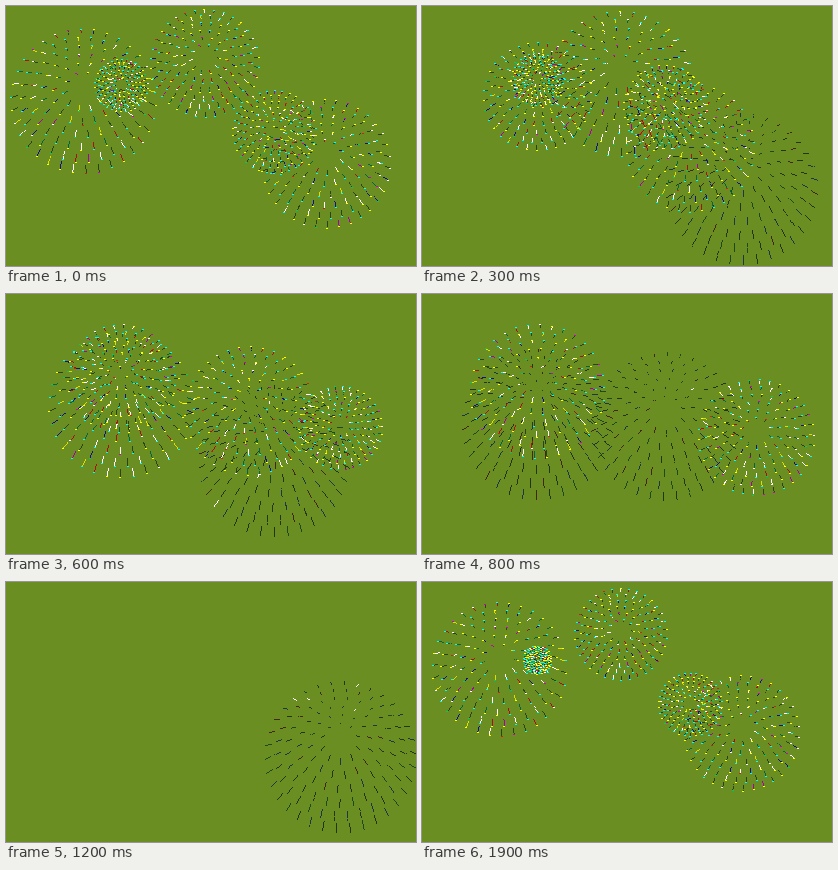
Animation, 410 px wide and 260 px high, one loop 2 s. Source, as an HTML page with a canvas:

```html
<!DOCTYPE html>
<html lang="en">
<head>
<meta charset="utf-8">
<title>Fireworks</title>
<style>
html, body { margin: 0; width: 100%; height: 100%; overflow: hidden; background: #6b8e23; }
canvas { display: block; }
</style>
</head>
<body>
<canvas id="sky" width="410" height="260"></canvas>
<script>
const ctx = document.getElementById('sky').getContext('2d');
const LOOP = 2000, STEP = 100;
const START_AGE = 1, FADE_AGE = 8, END_AGE = 10.2;

// x, y of each burst, in order of launch
const bursts = [
  [77, 61], [319.5, 135], [198.5, 43.5], [268, 119],
  [115, 77], [243, 94], [115, 71], [334, 127]
].map(([x, y], i) => ({ x, y, birth: 1200 + 150 * i, sparks: makeSparks(i + 1) }));

function seeded(seed) {
  let s = seed * 7919;
  return () => {
    s = (s * 1664525 + 1013904223) % 4294967296;
    return s / 4294967296;
  };
}

// list of [colour, weight], weights adding up to 1
function pick(list, n) {
  for (const [colour, weight] of list) {
    n -= weight;
    if (n < 0) return colour;
  }
  return list[0][0];
}

function makeSparks(seed) {
  const heads = [['#0ff', .4], ['#ff0', .4], ['#fff', .08], ['#0c6', .06], ['#c22', .03], ['#c0c', .03]];
  const tails = [['#2b4512', .36], ['#064', .15], ['#fff', .14], ['#a11', .12], ['#118', .1], ['#dd0', .08], ['#a0a', .05]];
  const ashes = [['#24360f', .5], ['#1c3845', .2], ['#1c4a1a', .18], ['#43280f', .1], ['#fff', .02]];
  const rand = seeded(seed);
  const sparks = [];
  for (const reach of [1, .87, .73, .58, .43, .28]) {
    const count = Math.round(34 * reach);
    const phase = rand();
    for (let i = 0; i < count; i++) {
      const angle = (i + phase) / count * Math.PI * 2;
      sparks.push({
        reach,
        dx: Math.cos(angle),
        dy: Math.sin(angle),
        head: pick(heads, rand()),
        tail: pick(tails, rand()),
        ash: pick(ashes, rand())
      });
    }
  }
  return sparks;
}

// one-pixel line without smoothing
function line(x0, y0, x1, y1, colour) {
  const n = Math.max(1, Math.round(Math.max(Math.abs(x1 - x0), Math.abs(y1 - y0))));
  ctx.fillStyle = colour;
  for (let i = 0; i < n; i++) {
    ctx.fillRect(Math.round(x0 + (x1 - x0) * i / n), Math.round(y0 + (y1 - y0) * i / n), 1, 1);
  }
}

function drawBurst(burst, age) {
  const radius = Math.min(76.5, 107.7 * (1 - Math.pow(.87, age)));
  const fall = .53 * age * age;
  const length = 1 + .6 * age;
  const faded = age > FADE_AGE;
  for (const s of burst.sparks) {
    const x = burst.x + s.dx * radius * s.reach;
    const y = burst.y + s.dy * radius * s.reach + fall * (.62 + .38 * s.reach);
    const pull = length * (.5 + .5 * s.reach);
    const tx = x - s.dx * pull;
    const ty = y - s.dy * pull - length * .05 * age;
    line(tx, ty, x, y, faded ? s.ash : s.tail);
    if (!faded) {
      ctx.fillStyle = s.head;
      ctx.fillRect(Math.round(x - .5), Math.round(y), 2, 1);
    }
  }
}

function draw(now) {
  const time = Math.floor(now / STEP) * STEP % LOOP;
  ctx.fillStyle = '#6b8e23';
  ctx.fillRect(0, 0, 410, 260);
  for (const burst of bursts) {
    const age = (time - burst.birth + 2 * LOOP) % LOOP / STEP;
    if (age >= START_AGE && age < END_AGE) drawBurst(burst, age);
  }
}

function tick() {
  draw(performance.now());
  requestAnimationFrame(tick);
}
tick();
</script>
</body>
</html>
```
